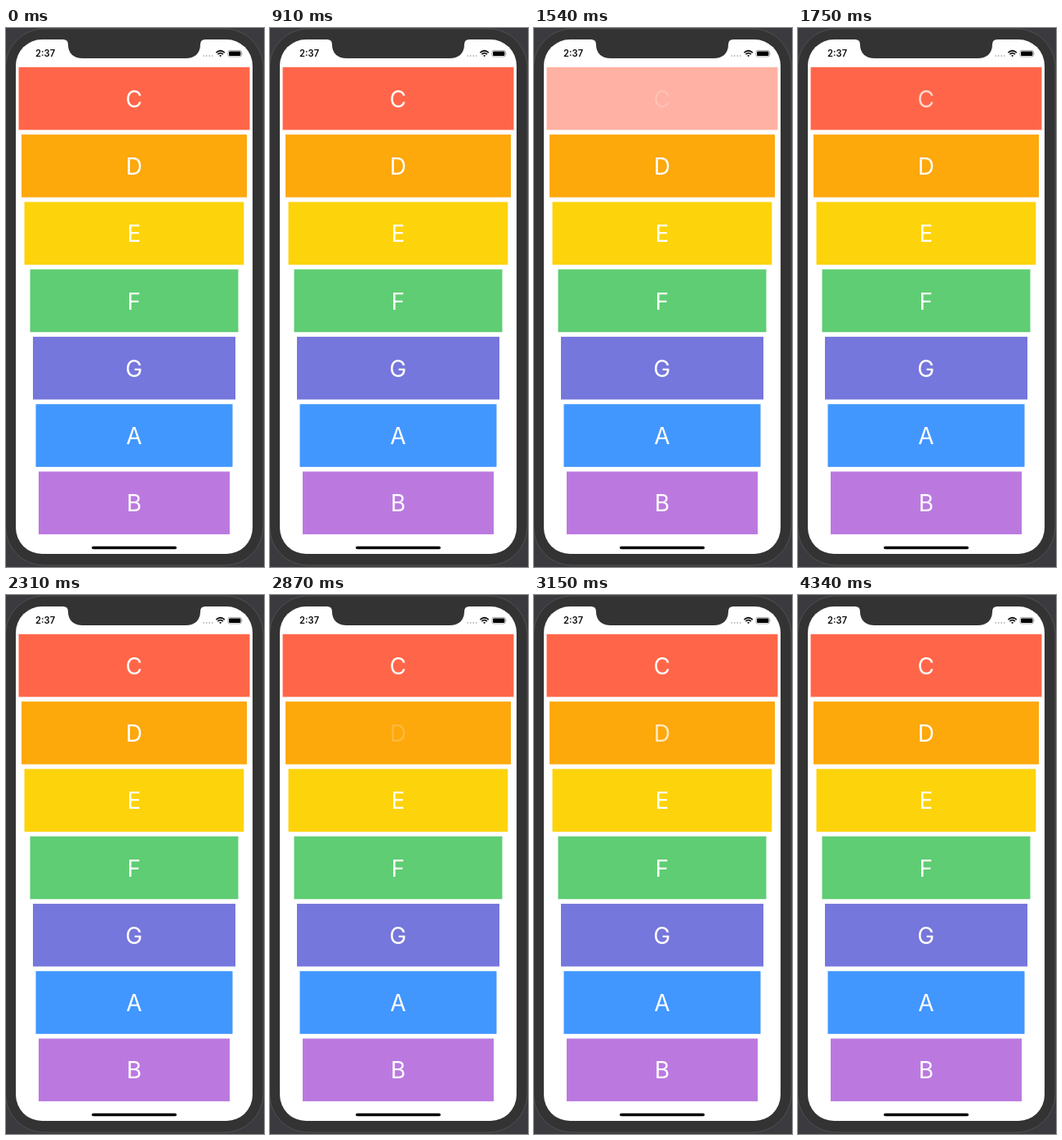
An HTML page that plays this animation: 316x658 px, repeating every 4410 ms.

```html
<!DOCTYPE html>
<html lang="en">
<head>
<meta charset="utf-8">
<title>Xylophone</title>
<style>
  html, body { margin: 0; width: 100%; height: 100%; overflow: hidden; background: #3a3a3f; }
  svg { display: block; width: 316px; height: 658px; }
  text { font-family: Inter, Roboto, sans-serif; }
  .note { font-size: 28px; fill: #fff; text-anchor: middle; }
</style>
</head>
<body>
<svg viewBox="0 0 316 658">
  <rect x="-.5" y="1" width="315.5" height="655" rx="47" fill="#333" stroke="#515153"/>
  <rect x="12" y="14" width="290" height="628" rx="32" fill="#fff"/>
  <path d="M70 13V14Q76 14 76 20C76 31 83 37 94 37H220C231 37 238 31 238 20Q238 14 244 14V13Z" fill="#333"/>

  <text x="36" y="35.3" font-size="11.2" font-weight="600" fill="#111">2:37</text>
  <g fill="#bbb">
    <circle cx="242.2" cy="34" r="1"/><circle cx="245.7" cy="34" r="1"/>
    <circle cx="249.2" cy="34" r="1"/><circle cx="252.7" cy="34" r="1"/>
  </g>
  <g fill="none" stroke="#111" stroke-width="1.7">
    <path d="M257.4 30.1Q262.6 25.4 267.8 30.1M259.3 32.2Q262.6 29.2 265.9 32.2"/>
    <path d="M261 33.6Q262.6 32.4 264.2 33.6L262.6 35.2Z" fill="#111" stroke="none"/>
  </g>
  <rect x="271.9" y="27.4" width="16.6" height="7.6" rx="2.2" fill="none" stroke="#999" stroke-width=".8"/>
  <rect x="273" y="28.5" width="14.4" height="5.4" rx="1.2" fill="#000"/>
  <path d="M289.4 30V32.6Q290.5 31.3 289.4 30Z" fill="#999"/>

  <g id="keys"></g>
  <rect x="105" y="632.7" width="104" height="3.6" rx="1.8" fill="#000"/>
</svg>
<script>
const LOOP = 4410, STEP = 70;
const HOLD = 100, DIM = 200, FADE = 470;

// note, colour, left, right, release time of the tap
const keys = [
  ['C', '#ff6649', 15.5, 298.5, 1540],
  ['D', '#fda80b', 19, 295, 2940],
  ['E', '#fdd30c', 22.5, 291.3],
  ['F', '#5fcd73', 29.5, 284.5],
  ['G', '#7677dc', 33, 281],
  ['A', '#4297ff', 36.5, 277.5],
  ['B', '#bb79e0', 40, 274]
];

function add(parent, tag, attrs) {
  const el = document.createElementNS('http://www.w3.org/2000/svg', tag);
  for (const k in attrs) el.setAttribute(k, attrs[k]);
  return parent.appendChild(el);
}

const root = document.getElementById('keys');
const bars = keys.map(([note, fill, left, right, release], i) => {
  const y = 47.8 + i * 82.28;
  const group = add(root, 'g', {});
  add(group, 'rect', { x: left, y, width: right - left, height: 76.6, fill });
  const label = add(group, 'text', { x: 156.8, y: y + 48.9, class: 'note' });
  label.textContent = note;
  return { group, label, release };
});

// The label dims while held and eases back after release.
function labelAlpha(age) {
  if (age < -HOLD || age >= FADE) return 1;
  if (age < 0) return 0.2;
  return 1 - 0.8 * (1 - age / FADE) ** 2;
}

function draw(now) {
  const t = Math.floor(now % LOOP / STEP) * STEP;
  for (const { group, label, release } of bars) {
    if (release === undefined) continue;
    const age = t - release;
    group.setAttribute('opacity', age >= 0 && age < DIM ? 0.5 : 1);
    label.setAttribute('opacity', labelAlpha(age));
  }
}

let start;
function tick(now) {
  start ??= now;
  draw(now - start);
  requestAnimationFrame(tick);
}
draw(0);
requestAnimationFrame(tick);
</script>
</body>
</html>
```
